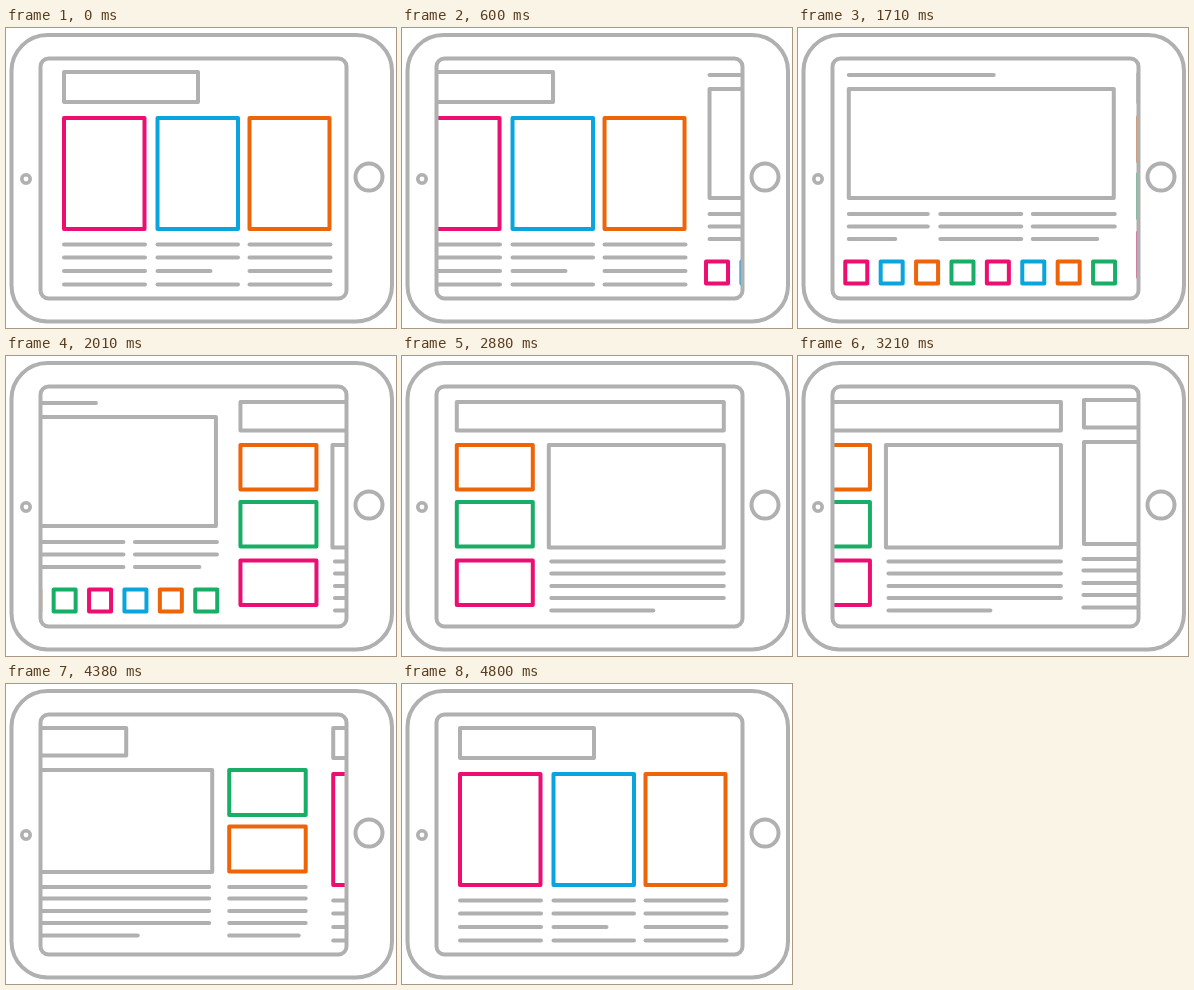
Animation of 390 by 300 pixels, one loop 5400 ms. Source, as an HTML page:

```html
<!DOCTYPE html>
<html lang="en">
<head>
<meta charset="utf-8">
<title>Tablet layouts</title>
<style>
html, body { margin: 0; width: 100%; height: 100%; overflow: hidden; background: #fff; }
svg { display: block; width: 390px; height: 300px; }
</style>
</head>
<body>
<svg viewBox="0 0 390 300" fill="none" stroke="#b0b0b0" stroke-width="4" stroke-linecap="round" stroke-linejoin="round">
  <clipPath id="screen"><rect x="35" y="31" width="305" height="239"/></clipPath>
  <g clip-path="url(#screen)"><g id="strip"></g></g>
  <rect x="5.5" y="7" width="380.5" height="286.5" rx="36"/>
  <rect x="34.5" y="30.5" width="306" height="240" rx="8"/>
  <circle cx="363" cy="149" r="13.5"/>
  <circle cx="20" cy="151" r="4.2" stroke-width="3.6"/>
</svg>
<script>
const PINK = '#ec0f71', BLUE = '#0aa5df', ORANGE = '#ee6408', GREEN = '#18ae66', GRAY = '#b0b0b0';
const PITCH = 291.5;                                    // distance between pages
const LOOP = 5400, START = 289, PERIOD = 1282.5, MOVE = 664;

const box = (x1, y1, x2, y2, color = GRAY) =>
  `<path d="M${x1} ${y1}H${x2}V${y2}H${x1}Z" stroke="${color}"/>`;
const line = (y, x1, x2) => `<path d="M${x1} ${y}H${x2}"/>`;
// A column of text lines; one row may be shorter
const text = (rows, x1, x2, shortRow = -1, shortX = x2) =>
  rows.map((y, i) => line(y, x1, i === shortRow ? shortX : x2)).join('');

const rowsA = [216.5, 229.5, 243, 256.5];
const rowsB = [186, 198.5, 211];
const rowsC = [205.5, 217.5, 230, 242, 254.5];
const rowsD = [203, 214.5, 227, 239, 251.5];

const columns = box(58, 44, 192, 74) +
  box(58, 90, 138.5, 201, PINK) + box(151.5, 90, 232, 201, BLUE) + box(243.5, 90, 323.5, 201, ORANGE) +
  text(rowsA, 58, 139) + text(rowsA, 151.5, 232, 2, 204.5) + text(rowsA, 243.5, 324.5);

let gallery = line(47, 57, 202) + box(57, 61, 322, 170) +
  text(rowsB, 57, 136, 2, 103.5) + text(rowsB, 148.5, 229.5) + text(rowsB, 241, 323, 2, 305.5);
for (let i = 0; i < 8; i++) {
  const x = 53.5 + 35.4 * i;
  gallery += box(x, 233.5, x + 22, 255.5, [PINK, BLUE, ORANGE, GREEN][i % 4]);
}

const sidebar = box(55, 46, 322, 74.5) +
  box(55, 89, 131, 133.5, ORANGE) + box(55, 146, 131, 190.5, GREEN) + box(55, 204.5, 131, 249, PINK) +
  box(147, 89, 322, 191.5) + text(rowsC, 149.5, 322, 4, 251.5);

const article = box(53.5, 44, 142.5, 71.5) + box(53.5, 86, 228.5, 188) +
  box(245.5, 86, 322, 131, GREEN) + box(245.5, 142.5, 322, 187.5, ORANGE) +
  text(rowsD, 53, 225.5, 4, 154) + text(rowsD, 245.5, 322, 4, 315);

const strip = document.getElementById('strip');
strip.innerHTML = [columns, gallery, sidebar, article, columns]
  .map((page, i) => `<g transform="translate(${i * PITCH})">${page}</g>`).join('');

// cubic-bezier(.9, 0, .667, 1), solved by bisection
function ease(t) {
  if (t <= 0) return 0;
  if (t >= 1) return 1;
  let lo = 0, hi = 1, s;
  for (let i = 0; i < 24; i++) {
    s = (lo + hi) / 2;
    const x = 2.7 * s * (1 - s) ** 2 + 2 * s * s * (1 - s) + s ** 3;
    if (x < t) lo = s; else hi = s;
  }
  return s * s * (3 - 2 * s);
}

const origin = performance.now();
function draw(now) {
  const t = Math.max(0, now - origin) % LOOP;
  let pages = 0;
  for (let k = 0; k < 4; k++) pages += ease((t - START - k * PERIOD) / MOVE);
  strip.setAttribute('transform', `translate(${-pages * PITCH})`);
  requestAnimationFrame(draw);
}
draw(origin);
</script>
</body>
</html>
```
